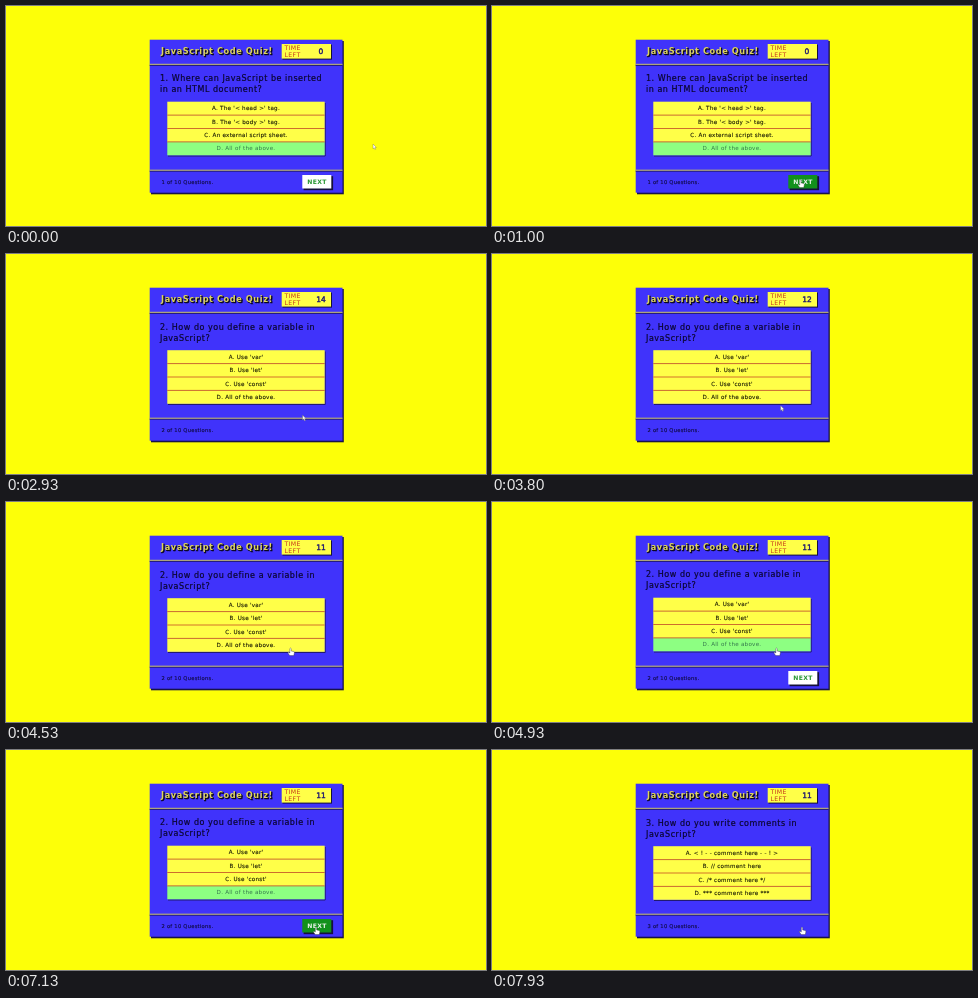
Write an HTML page that moves like this. It is 480 px wide and 220 px high and loops after 8 s.

```html
<!DOCTYPE html>
<html lang="en">
<head>
<meta charset="utf-8">
<title>Code quiz</title>
<style>
  html, body { margin: 0; width: 100%; height: 100%; overflow: hidden; background: #fdff08; }
  svg { display: block; width: 100%; height: 100%; }
  text { font-family: "DejaVu Sans", sans-serif; white-space: pre; }
  .title { font-size: 8.2px; font-weight: bold; letter-spacing: .58px; }
  .question { font-size: 8px; letter-spacing: .53px; fill: #0a0530; stroke: #0a0530; stroke-width: .2; }
  .option { font-size: 5.6px; letter-spacing: .26px; text-anchor: middle; fill: #1c1c04; stroke: #1c1c04; stroke-width: .12; }
  .option.correct { fill: #35784c; stroke: none; }
  .count { font-size: 5.2px; letter-spacing: .25px; fill: #0d0838; stroke: #0d0838; stroke-width: .1; }
  .time { font-size: 6.2px; letter-spacing: .4px; fill: #c63a1c; }
  .number { font-size: 7.5px; text-anchor: middle; fill: #1d1670; stroke: #1d1670; stroke-width: .4; }
  .next { font-size: 6.1px; letter-spacing: .3px; font-weight: bold; text-anchor: middle; }
</style>
</head>
<body>
<svg viewBox="0 0 480 220" preserveAspectRatio="none">
  <rect width="480" height="220" fill="#fdff08"/>

  <rect x="145" y="35" width="192.8" height="153.3" fill="#17134a"/>
  <rect x="143.7" y="33.7" width="192.8" height="153" fill="#4033fb"/>
  <path d="M143.7 59.4H336.5M143.7 165.2H336.5" stroke="#211a70"/>
  <path d="M143.7 58.3H336.5M143.7 164.2H336.5" stroke="#c9c060"/>

  <text class="title" x="156" y="49" fill="#0b0720" stroke="#0b0720" stroke-width=".6">JavaScript Code Quiz!</text>
  <text class="title" x="155" y="48.1" fill="#ddd45c">JavaScript Code Quiz!</text>

  <rect x="276.5" y="38.6" width="49.5" height="15" fill="#15103c"/>
  <rect x="275.7" y="38" width="49.3" height="14.6" fill="#ffff48"/>
  <text class="time" x="278.4" y="43.9">TIME</text>
  <text class="time" x="278.4" y="50.9">LEFT</text>
  <text class="number" id="number" x="315" y="47.8"></text>

  <g id="quiz">
    <text class="question" x="154" y="75"></text>
    <text class="question" x="154" y="86.2"></text>
    <path d="M162 150H319.2V97" fill="none" stroke="#211a70"/>
    <g id="options"></g>
  </g>

  <text class="count" id="count" x="155.5" y="177.8"></text>
  <g id="button">
    <rect x="297.6" y="170.2" width="29.5" height="14" fill="#15103c"/>
    <rect id="face" x="296.3" y="169" width="29" height="13.5"/>
    <text class="next" id="next" x="311" y="178"></text>
  </g>

  <g id="cursor" fill="#fff" stroke-width=".4" stroke-linejoin="round">
    <path id="arrow" stroke="#77774a" d="M0 0V4.8L1.1 3.9L1.9 5.5L2.7 5.2L1.9 3.5H3.4Z"/>
    <path id="hand" stroke="#333" d="M-.7 .6Q0-.5 .7 .6V3L3.2 3.5Q4 3.8 3.9 4.7L3.3 7.6H-.8L-2.7 4.8Q-2.4 3.8-1.5 4.4L-.7 5Z"/>
  </g>
</svg>
<script>
const $ = id => document.getElementById(id);
const LOOP = 8, SECOND = 0.5, FADE = 0.15;
const SECOND_QUESTION = 1.75, ANSWERED = 4.55, THIRD_QUESTION = 7.6;
const ROW_TOP = 95.7, ROW_HEIGHT = 13.4;

const questions = [
  { lines: ["1. Where can JavaScript be inserted", "in an HTML document?"],
    options: ["A. The '< head >' tag.", "B. The '< body >' tag.", "C. An external script sheet.", "D. All of the above."] },
  { lines: ["2. How do you define a variable in", "JavaScript?"],
    options: ["A. Use 'var'", "B. Use 'let'", "C. Use 'const'", "D. All of the above."] },
  { lines: ["3. How do you write comments in", "JavaScript?"],
    options: ["A. < ! - - comment here - - ! >", "B. // comment here", "C. /* comment here */", "D. *** comment here ***"] }
];

// time, x, y of the pointer tip
const route = [
  [0, 367, 138], [0.2, 367, 138], [0.8, 308.5, 174], [2.6, 307.5, 174], [3.2, 288.7, 151.8],
  [4, 288.7, 151.8], [4.3, 284.5, 146], [5.3, 284.5, 146], [6, 310, 171.5], [6.4, 310, 177], [8, 310, 177]
];
const handTimes = [[0.72, 2.75], [4.2, 5.4], [6.03, 8]];
const hoverTimes = [[0.72, SECOND_QUESTION], [6.03, THIRD_QUESTION]];

const clamp = v => Math.max(0, Math.min(1, v));
const ease = v => v * v * (3 - 2 * v);
const within = (t, spans) => spans.some(([a, b]) => t >= a && t < b);
const mix = (a, b, k) => `rgb(${a.map((v, i) => Math.round(v + (b[i] - v) * k))})`;

function addSvg(tag, attributes) {
  const node = document.createElementNS("http://www.w3.org/2000/svg", tag);
  for (const name in attributes) node.setAttribute(name, attributes[name]);
  return $("options").appendChild(node);
}

const rows = [0, 1, 2, 3].map(i => {
  const y = ROW_TOP + i * ROW_HEIGHT;
  return {
    box: addSvg("rect", { x: 161.3, y, width: 157.4, height: ROW_HEIGHT }),
    label: addSvg("text", { class: "option", x: 240, y: y + 8.5 })
  };
});
for (let i = 1; i < 4; i++) {
  addSvg("path", { d: `M161.3 ${ROW_TOP + i * ROW_HEIGHT}h157.4`, stroke: "#cf6424", "stroke-width": .9 });
}
const lines = document.querySelectorAll(".question");
$("next").textContent = "NEXT";

function pointerAt(t) {
  const i = Math.max(1, route.findIndex(p => p[0] > t));
  const [a, b] = [route[i - 1], route[i]];
  const k = ease((t - a[0]) / (b[0] - a[0]));
  return [a[1] + (b[1] - a[1]) * k, a[2] + (b[2] - a[2]) * k];
}

function timeLeft(t) {
  const ticks = Math.floor((Math.min(t, ANSWERED) - SECOND_QUESTION) / SECOND);
  return ticks < 1 ? 0 : 16 - ticks;
}

function buttonOpacity(t) {
  if (t < ANSWERED) return 1 - clamp((t - SECOND_QUESTION) / FADE);
  return clamp((t - ANSWERED) / FADE) * (1 - clamp((t - THIRD_QUESTION) / FADE));
}

function hoverAmount(t) {
  return Math.max(...hoverTimes.map(([a, b]) => clamp((t - a) / FADE) * (t < b + FADE)));
}

function draw(t) {
  const index = t < SECOND_QUESTION ? 0 : t < THIRD_QUESTION ? 1 : 2;
  const answered = index === 0 || (index === 1 && t >= ANSWERED);
  const question = questions[index];

  lines.forEach((line, i) => line.textContent = question.lines[i]);
  rows.forEach(({ box, label }, i) => {
    const correct = answered && i === 3;
    label.textContent = question.options[i];
    label.classList.toggle("correct", correct);
    box.setAttribute("fill", correct ? "#8dff82" : "#ffff48");
  });
  $("quiz").setAttribute("transform", `translate(0 ${answered ? 0 : 0.5})`);
  $("count").textContent = `${index + 1} of 10 Questions.`;
  $("number").textContent = timeLeft(t);

  const hover = hoverAmount(t);
  $("button").setAttribute("opacity", buttonOpacity(t));
  $("face").setAttribute("fill", mix([255, 255, 255], [18, 145, 28], hover));
  $("next").setAttribute("fill", mix([40, 150, 50], [235, 245, 235], hover));

  const hand = within(t, handTimes);
  $("cursor").setAttribute("transform", `translate(${pointerAt(t)})`);
  $("hand").setAttribute("visibility", hand ? "visible" : "hidden");
  $("arrow").setAttribute("visibility", hand ? "hidden" : "visible");
}

function frame() {
  draw(performance.now() / 1000 % LOOP);
  requestAnimationFrame(frame);
}
frame();
</script>
</body>
</html>
```
